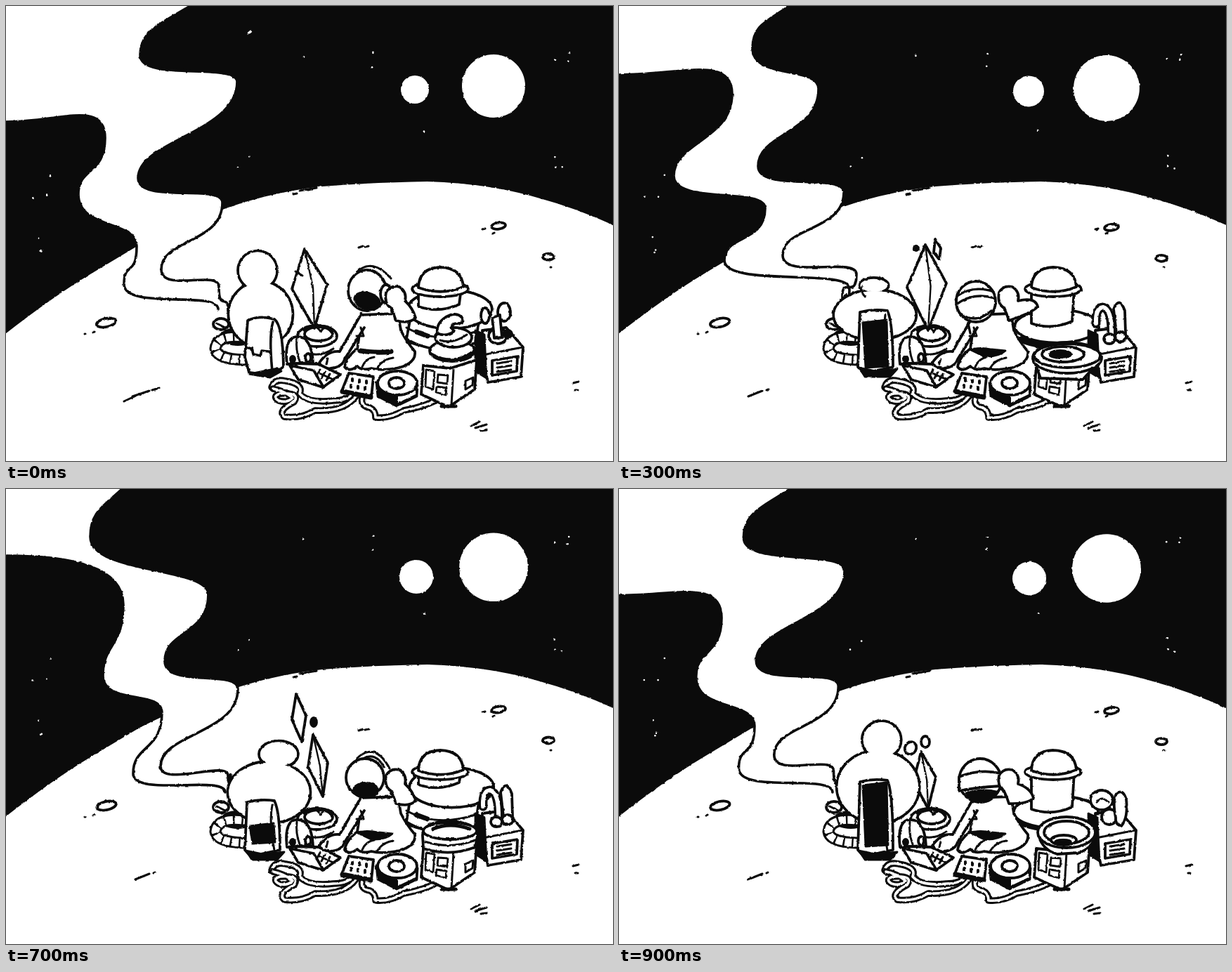
These frames come from a looping animation (864 by 648 pixels, 1000 ms). An HTML page:

```html
<!DOCTYPE html>
<html lang="en">
<head>
<meta charset="utf-8">
<title>Moon camp</title>
<style>
html, body { margin: 0; width: 100%; height: 100%; overflow: hidden; background: #fff; }
svg { display: block; width: 864px; height: 648px; }
#stage { fill: #fff; stroke: #0b0b0b; stroke-width: 3.8; stroke-linecap: round; stroke-linejoin: round; }
.ink { fill: #0b0b0b; }
.fill { stroke: none; }
.thin { stroke-width: 2.8; }
</style>
</head>
<body>
<svg viewBox="0 0 864 648">
  <filter id="rough" filterUnits="userSpaceOnUse" x="-20" y="-20" width="904" height="688" color-interpolation-filters="sRGB">
    <feTurbulence id="noise" type="fractalNoise" baseFrequency=".18" numOctaves="2"/>
    <feDisplacementMap in="SourceGraphic" scale="2.6" xChannelSelector="R" yChannelSelector="G"/>
  </filter>
  <g id="stage" filter="url(#rough)"></g>
</svg>
<script>
const path = (d, cls = '') => `<path d="${d}" class="${cls}"/>`;
const line = (d, w = 3) => `<path d="${d}" fill="none" stroke-width="${w}"/>`;
const ink = d => path(d, 'ink thin');
const oval = (x, y, rx, ry = rx, cls = '', turn = 0) =>
  `<ellipse cx="${x}" cy="${y}" rx="${rx}" ry="${ry}" class="${cls}" transform="rotate(${turn} ${x} ${y})"/>`;
const cable = (d, w = 9.5, core = 3.6) => line(d, w) + `<path d="${d}" fill="none" stroke="#fff" stroke-width="${core}"/>`;
const times = (n, f) => Array.from({ length: n }, (_, j) => f(j)).join('');
const wobble = (i, n) => 1.6 * Math.sin(i * 2.4 + n * 3.7);
const random = n => { const v = Math.sin(n * 12.9898) * 43758.5453; return v - Math.floor(v); };

const starts = [0, 200, 300, 400, 500, 700, 800, 900];

// Smoke: the turning points of both banks at a few moments, eased in between.
const points = s => s.split(' ').map(p => p.split(',').map(Number));
const plume = [
  [0, '262,0 191,70 329,108 188,245 308,280 221,375 303,400 316,434', '0,165 141,188 103,268 186,342 168,396 302,432'],
  [200, '278,0 240,50 362,80 243,225 319,250 229,362 322,382 318,405', '0,126 144,150 96,250 175,305 154,370 306,412'],
  [300, '242,0 190,60 284,118 198,228 320,265 233,355 338,382 318,412 318,416', '0,98 161,125 78,242 208,288 150,362 328,402 322,420 324,430'],
  [500, '215,0 197,25 266,72 199,185 297,210 222,315 340,345 285,403 312,413', '0,106 142,130 101,212 197,255 136,330 278,362 240,402 312,432'],
  [700, '165,0 120,68 288,150 226,245 330,285 220,395 316,408 320,412', '0,95 167,165 138,265 222,318 181,405 312,432']
].map(([at, ...banks]) => ({ at, banks: banks.map(points) }));

function bank(i, side) {
  const t = starts[i], k = plume.findLastIndex(p => p.at <= t);
  const a = plume[k], b = plume[k + 1] || { ...plume[0], at: 1000 };
  const e = 1 - (1 - (t - a.at) / (b.at - a.at)) ** 1.5;
  if (!e) return a.banks[side];
  return a.banks[side].map((p, n) => p.map((v, c) => v + (b.banks[side][n][c] - v) * e));
}

// Every turning point has a vertical tangent; longer runs get longer handles.
function edge(pts) {
  let [x, y] = pts[0], d = `${x} ${y}`;
  pts.slice(1).forEach(([u, v], n) => {
    const k = 22 + .3 * (v - y), hump = !n && u > x;
    const c = n ? `${x} ${y + k * 1.15}` : `${x + .55 * (u - x)} ${hump ? y : y + .35 * (v - y)}`;
    d += `C${c} ${u} ${v - (hump ? 55 : k * .85)} ${u} ${v}`;
    [x, y] = [u, v];
  });
  return d;
}

function sky(i) {
  const r = bank(i, 0), l = bank(i, 1);
  return path(`M${edge(r)}L${r.at(-1)[0]} 700L900 700L900 -20L${r[0][0]} -20Z`, 'ink fill') +
    path(`M-20 ${l[0][1]}L${edge(l)}L${l.at(-1)[0]} 700L-20 700Z`, 'ink fill');
}
const smoke = i => [0, 1].map(side => line('M' + edge(bank(i, side)), 3.6)).join('');
const ground = path('M-20 482Q60 418 120 382Q155 361 190 340Q250 310 300 293Q370 266 450 257Q530 251 600 250Q690 253 760 274Q820 290 890 324V700H-20Z', 'fill');

const clusters = points('437,70 511,76 792,78 595,186 332,225 784,222 60,248 46,273 52,340');
function space(i) {
  const grow = Math.min(1, i / 4);
  const stars = clusters.map(([x, y], n) => times(1 + n % 3, j =>
    oval(x + 26 * (random(n + j * 9) - .5) + wobble(i, n), y + 26 * (random(n + j * 7 + 40) - .5) + wobble(i, j), 1.3, 1.3, 'fill')));
  return oval(582 + grow * 2, 119 + i * 1.2, 20 + grow * 4, 20 + grow * 4, 'fill') +
    oval(694, 114 + 3 * Math.sin(i * .85), 45 + grow * 3.8, 45 + grow * 3.8, 'fill') +
    stars.join('') + (i ? '' : oval(347, 37, 3.5, 2, 'fill', -30));
}

function marks(i) {
  const j = wobble(i, 1);
  const scratch = i ? 'M184 556L204 548M210 547L212 546' : 'M168 563L185 555M180 556L204 548M208 547L218 544';
  return oval(143 + j / 2, 451, 14, 6, '', -12) + oval(701, 314 + j, 10, 4.5, '', -8) + oval(772, 358 + j, 8, 4.5) +
    line('M112 467h1M124 465l2 -1M678 318l4 -1M693 324l2 -1M775 372h1M502 344l6 -2M511 343l5 -1M409 268l5 -1M418 263L442 259', 3) +
    line(scratch + 'M807 537L815 535M810 547L814 547M662 598L674 592M668 601L684 596M676 605L684 604', 3);
}

// Blob: half its height drives everything else while the head sways.
const squash = [47, 41, 36, 45, 53, 44, 48, 52];
function blob(i) {
  const q = squash[i], wide = i ? 59 : 46, base = i ? 476 : 486;
  const hx = 372 - 16 * Math.cos(2 * Math.PI * (i - .7) / 8.6), bx = 368 + .4 * (hx - 372);
  const hr = q - (i ? 25 : 19), hw = Math.min(28, hr + 10), hy = base - 2 * q - hr * .55;
  const shape = (inset, cls) => oval(hx, hy, hw - inset, hr - inset, cls) + oval(bx, base - q, wide - inset, q - inset, cls);
  const dent = q < 40 ? line(`M${bx - 18} ${hy + 2}Q${bx - 22} ${hy + 8} ${bx - 14} ${hy + 16}`) : '';
  return shape(0) + shape(2, 'fill') + dent;
}

const hose = 'M338 472Q300 468 298 488Q300 503 338 504';
const pot = oval(330, 471, 24, 11, 'ink') + oval(306, 453, 11, 8) + line('M300 452L312 458') + cable(hose, 17, 11) +
  `<path d="${hose}" fill="none" stroke-width="13" style="stroke-dasharray:2.5 10;stroke-linecap:butt"/>`;

const bag = (top, from, to) =>
  path(`M343 ${top}Q362 ${top - 5} 382 ${top - 2}Q390 ${top + 14} 390 514L348 523L340 514Z`) + line(`M379 ${top + 4}Q374 475 382 514`) +
  ink(`M347 ${from}L381 ${from - 4}L383 ${to - 2}L351 ${to}Z`) + ink('M342 515L366 520L396 517L386 528L350 528Z');
const bags = [
  path('M344 448Q360 440 382 446Q394 455 395 514L376 526L346 522L340 500Z') + ink('M346 524L386 516L392 520L376 529Z') +
    line('M380 450Q374 470 379 520M341 486L350 488L352 496L362 498L364 491L374 492', 3.6),
  bag(446, 480, 505), bag(436, 451, 515), bag(417, 422, 509)];

// Crystal: a kite from tip to foot, with loose chips.
function gem(x, top, wide, foot, lean) {
  const mid = top + (foot - top) * .45, c = x + lean / 2;
  return path(`M${x} ${top}L${c + wide} ${mid}L${x + lean} ${foot}L${c - wide} ${mid + 6}Z`) +
    (wide > 12 ? line(`M${x} ${top}L${c + wide * .2} ${mid + 4}L${x + lean} ${foot}`, 2.4) : '');
}
const shards = [
  gem(425, 346, 25, 459, 14) + line('M412 378L422 384'),
  gem(441, 350, 24, 454, 5) + gem(419, 335, 8, 365, 0),
  gem(436, 340, 28, 462, 4) + gem(450, 332, 5, 361, 6) + oval(423, 345, 3, 3, 'ink'),
  gem(440, 364, 17, 440, 18) + gem(446, 335, 8, 358, 0) + line('M418 374L428 362L434 374M421 356L429 344'),
  gem(413, 292, 10, 360, 8) + gem(437, 350, 14, 438, 14) + oval(438, 332, 4, 6, 'ink'),
  gem(430, 374, 16, 455, 10) + oval(415, 369, 8, 9, '', 30) + oval(436, 360, 6, 8)];
const stand = oval(443, 470, 28, 15) + oval(445, 467, 20, 10) + line('M424 462Q438 448 448 464Q454 452 464 466M422 492Q446 502 466 488');

// Hat machine: a collar slides up and down the column.
const collar = [432, 460, 456, 432, 409, 425, 443, 460];
function hat(i) {
  const y = collar[i], lift = 460 - y, x = 622 + lift * .35, foot = Math.max(y - 4, 410);
  let s = ink('M562 474Q590 466 622 483Q600 492 562 474Z');
  if (lift > 15) s += path(`M578 ${y}L570 474Q612 500 668 480L676 ${y}Z`) +
    line('M570 458Q612 482 668 464') + line('M590 438L616 441M634 441L664 438M584 464L600 470', 7);
  return s + oval(x, y, 60, 23 + lift * .16) + path(`M587 402V${foot}Q616 ${foot + 10} 645 ${foot - 3}L648 402Z`) +
    oval(618, 403, 40, 11) + path('M587 401Q588 373 618 372Q649 373 651 400Q620 413 587 401Z');
}

const knobs = [
  oval(682, 441, 6, 11) + oval(709, 436, 9, 13) + oval(700, 470, 13, 11) + path('M692 444L703 440L706 472L695 473Z') + oval(714, 467, 6, 5, 'ink'),
  oval(687, 443, 16, 14) + line('M680 446Q688 436 696 446') + oval(698, 467, 11, 11) + path('M707 468Q702 444 708 434Q717 426 722 442Q725 468 715 480Q706 478 707 468Z'),
  path('M704 432Q712 412 720 434L721 466L708 466Z') + cable('M679 452Q678 430 689 429Q702 432 701 470', 13, 6) + oval(698, 474, 8, 7) + oval(714, 471, 8, 7)];
const panel = path('M678 462L712 458L736 486L733 528L686 536L678 500Z') + line('M684 496L735 486') +
  ink('M668 462L681 468L684 530L668 520Z') + path('M692 505L728 499L727 520L692 526Z') + times(3, j => line(`M699 ${509 + j * 6}l20 -3`));

const crate = path('M594 512L632 516L670 504L667 546L630 571L591 553Z') + line('M637 518L634 568M654 534L665 529L664 540L654 546Z') +
  path('M598 518L610 520L608 546L597 542Z', 'thin') + path('M615 525l14 1l-1 12l-14 -2Z', 'thin') + path('M613 542l14 2l-1 10l-14 -4Z', 'thin') + line('M620 570L640 570', 5);
const tops = [
  oval(635, 491, 32, 15) + line('M605 496Q636 514 666 492', 5) + oval(637, 472, 26, 14) +
    path('M614 466Q612 452 626 443Q642 434 650 445Q653 453 640 452Q630 456 638 463Q626 472 614 466Z') + line('M618 476Q636 482 656 468'),
  path('M593 494Q592 474 632 473Q672 476 671 494L668 510Q632 524 594 512Z') + oval(632, 487, 38, 12) + line('M608 484Q632 474 660 484', 5) + line('M596 502Q632 514 668 500'),
  path('M592 508L600 530L660 532L682 508Z') + oval(638, 501, 49, 22) + oval(638, 498, 47, 17) + oval(632, 496, 30, 11) + oval(628, 496, 15, 5, 'ink'),
  path('M597 494Q604 515 624 520L655 518Q676 510 678 492Z') + oval(637, 489, 41, 22) + oval(637, 489, 32, 16) + oval(633, 500, 18, 7) + oval(632, 503, 11, 3, 'ink')];

// Astronaut: the head nods while the elbow swings.
const torso = path('M505 440Q504 465 500 488Q484 500 482 514Q488 522 500 513Q506 520 520 516Q535 520 560 515Q584 508 582 492Q570 478 562 462L558 438Z') +
  line('M507 514Q512 502 524 500M528 516Q536 503 551 501') +
  path('M506 438L475 492Q458 490 446 508Q450 518 462 516Q478 515 482 503L510 458') + line('M505 458L509 470L499 470M458 502L456 510');
const lap = pose => pose ? ink('M499 489Q515 486 530 489L550 491Q540 500 520 499Z') : line('M504 491Q530 495 548 492', 7);
const heads = [
  oval(514, 405, 27, 29) + oval(514, 420, 18, 11, 'ink', 15) + line('M499 379Q522 358 548 388') + oval(541, 410, 8, 13),
  oval(511, 411, 27, 27) + oval(512, 429, 17, 10, 'ink') + line('M500 383Q526 360 546 398M508 384Q526 374 538 396'),
  oval(508, 421, 28, 29) + line('M481 413Q505 397 533 407M480 425Q505 407 534 416M486 438Q508 454 530 434M497 452L500 466', 3.4),
  oval(514, 415, 30, 31) + ink('M494 433Q516 426 538 431Q532 446 516 446Q500 444 494 433Z') + path('M484 410Q514 398 543 405L543 423Q514 424 484 430Z')];
function arm(pose) {
  const swing = Math.max(0, pose - 1) % 3, x = [583, 596, 590][swing], y = [444, 428, 440][swing];
  return path(`M541 408Q547 397 560 400Q571 407 568 420Q${x - 4} ${y - 14} ${x} ${y}Q${x - 8} ${y + 9} 555 448Q552 438 548 430Q538 424 541 408Z`);
}

const radio = path('M400 510C396 478 406 470 416 471C432 472 436 490 437 508Z') + line('M414 474Q412 490 418 506') + oval(430, 501, 4, 6) + oval(408, 503, 3, 4, 'ink');
const laptop = path('M412 509L445 510L476 525L451 543L418 532Z') + path('M404 512L438 519L452 543L416 532Z') +
  times(3, j => line(`M${447 + j * 7} ${518 + j * 3}l-5 9`)) + line('M446 523L466 532');
const mixer = path('M488 523L523 528L520 557L478 548Z') + line('M479 549L519 557', 7) +
  times(6, n => line(`M${493 + n % 3 * 10 - (n > 2) * 2} ${531 + n % 3 * 1.5 + (n > 2) * 9}v3`, 4));
const deck = ink('M527 536L556 556L586 540L585 556L556 570L529 556Z') + path('M558 555L583 544L583 553L558 565Z', 'fill') + oval(557, 537, 28, 17) + oval(556, 537, 11, 8);
const wires = cable('M378 543Q382 530 398 534Q424 538 418 552Q430 566 466 562Q486 562 494 552') +
  cable('M380 545Q396 548 408 558Q400 566 388 562Q378 556 390 552Q420 550 410 564Q386 576 396 585Q420 588 440 576Q482 578 498 556') +
  cable('M507 558Q504 570 518 572Q526 576 526 586Q546 588 566 576Q600 570 622 556');

function scene(i) {
  const pose = i % 4, shard = Math.floor(i * 3 / 4 + .5);
  return '<rect x="-20" y="-20" width="904" height="688" class="fill"/>' +
    sky(i) + space(i) + ground + smoke(i) + marks(i) +
    pot + hat(i) + stand + shards[shard] + blob(i) + bags[pose] + radio +
    torso + lap(pose) + heads[pose] + arm(pose) +
    panel + knobs[i % 3] + wires + laptop + mixer + deck + crate + tops[pose];
}

const stage = document.getElementById('stage'), noise = document.getElementById('noise');
const scenes = starts.map((_, i) => scene(i));
let shown = -1;
function tick(now) {
  const i = starts.findLastIndex(s => s <= now % 1000);
  if (i != shown) {
    shown = i;
    stage.innerHTML = scenes[i];
    noise.setAttribute('seed', i + 1);
  }
  requestAnimationFrame(tick);
}
tick(0);
</script>
</body>
</html>
```
